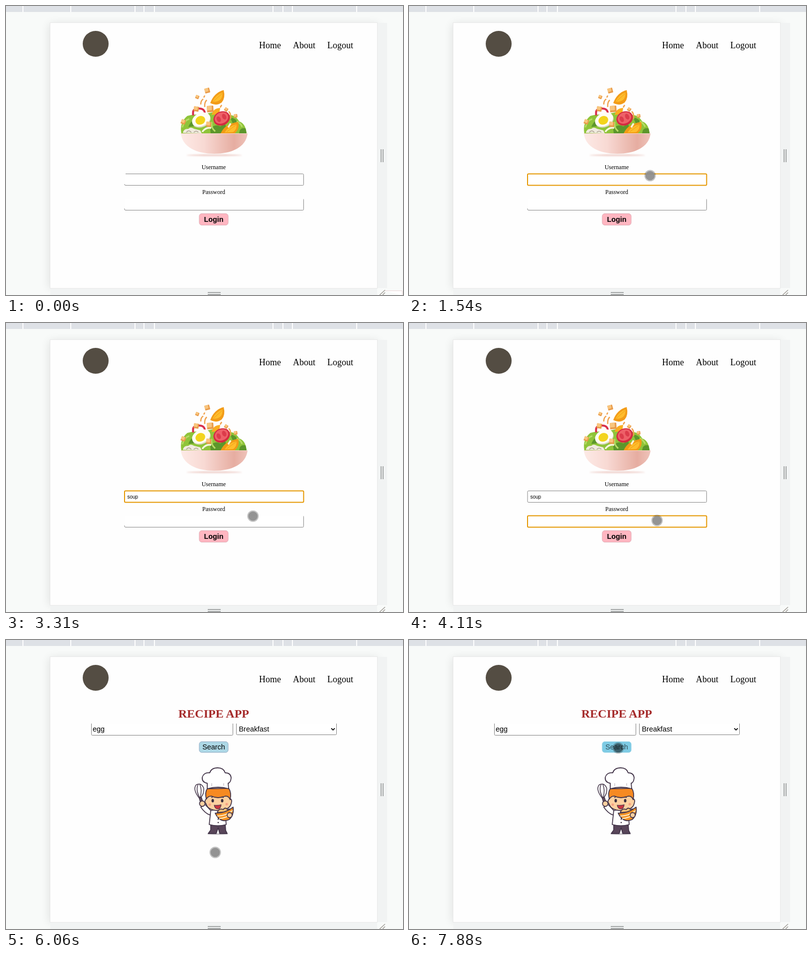
An HTML page that plays this animation: 797x581 px, repeating every 8 s.

```html
<!DOCTYPE html>
<html lang="en">
<head>
<meta charset="utf-8">
<title>Recipe app login</title>
<style>
  html, body { margin: 0; width: 100%; height: 100%; overflow: hidden; background: #f8faf9; }
  svg { display: block; width: 100%; height: 100%; }
  .serif { font-family: "Liberation Serif", "Times New Roman", serif; }
  .sans { font-family: "Liberation Sans", Arial, sans-serif; }
  .nav { font-size: 18px; }
  .label { font-size: 12px; text-anchor: middle; }
  .typed { font-size: 10px; }
  .control { font-size: 14.4px; }
  .middle { text-anchor: middle; }
  .field { fill: #fff; stroke: #858585; }
  .field.focus { stroke: #e59700; stroke-width: 2; }
  /* Edges not yet painted before a field is first used */
  #userField.fresh { stroke-dasharray: 739 40; }
  #passField.fresh { stroke-dasharray: 0 357 383 40; }
  .ink { stroke: #44364a; stroke-width: 1.8; stroke-linejoin: round; stroke-linecap: round; }
  #cursor { fill: #8f8f8f; fill-opacity: .92; }
  #cursor .halo { fill: #000; fill-opacity: .23; }
  #cursor.down { fill: #c5c54b; }
  #cursor.down .halo { fill: #d2d21c; fill-opacity: .7; }
  #cursor.over { fill: #000; fill-opacity: .38; }
  #search rect { fill: #add8e6; stroke: #91a9c4; }
  #search.hover rect { fill: #7ecbe4; stroke: #8bcfe5; }
  #search.hover text { fill: #334e58; }
</style>
</head>
<body>
<svg viewBox="0 0 797 581" xmlns="http://www.w3.org/2000/svg">
  <defs>
    <linearGradient id="china">
      <stop offset="0" stop-color="#fdeae6"/>
      <stop offset=".35" stop-color="#f8d9d3"/>
      <stop offset=".8" stop-color="#e6ada1"/>
      <stop offset="1" stop-color="#efc3ba"/>
    </linearGradient>
    <filter id="soft" x="-20%" y="-20%" width="140%" height="140%"><feGaussianBlur stdDeviation="9"/></filter>
    <filter id="blur" x="-20%" y="-200%" width="140%" height="500%"><feGaussianBlur stdDeviation="1.5"/></filter>
  </defs>

  <!-- Browser tools around the page -->
  <rect width="797" height="581" fill="#f8faf9"/>
  <rect x="87" y="36" width="660" height="532" fill="#000" opacity=".1" filter="url(#soft)"/>
  <rect width="797" height="12" fill="#dee1e6"/>
  <path id="rulerGaps" stroke="#fff" stroke-width="2"/>
  <path d="M745 34h20v533h-20zM89 567h656v14H89z" fill="#f1f3f3"/>
  <path d="M745 567h52v14h-52z" fill="#f8faf9"/>
  <rect x="88.5" y="33.5" width="657" height="534" fill="#fefefe" stroke="#e8e8e8"/>
  <path d="M753 288v26M757 288v26M405 576h26M405 580h26" stroke="#a3a6a6" stroke-width="2"/>
  <path d="M750 581l11-10M756 581l5-5" stroke="#a3a09a" stroke-width="1.6"/>
  <path id="corner" d="M761 572.5h34.5v9" fill="#fff" stroke="#e9d5d5"/>

  <circle cx="180" cy="76" r="26" fill="#544d43"/>
  <g class="serif nav">
    <text x="508" y="85">Home</text><text x="576" y="85">About</text><text x="645" y="85">Logout</text>
  </g>

  <g id="loginPage">
    <g id="salad">
      <ellipse cx="418" cy="300" rx="56" ry="1.5" fill="#ecc8c1" filter="url(#blur)"/>
      <path d="M352 256Q348 234 364 221 376 217 390 219L418 213 447 219Q461 219 468 232 481 236 483 256Z" fill="#8fc43a"/>
      <path d="M366 243q6-14 15-17l-4 16zM410 248q8-12 20-6l10-5q4 8-2 19h-27zM450 224q13 2 16 12l-10 2zM468 256q1-13 13-10l2 10z" fill="#5c962b"/>
      <path d="M354 244q4-14 14-17M413 233q-2 12 7 19M463 232q8 3 11 11" stroke="#b7dc66" stroke-width="3" fill="none"/>
      <path d="M376 220q-3-14 10-14 14 0 13 11" fill="none" stroke="#d8304c" stroke-width="4"/>
      <path d="M391 198q0-8 5-11M399 203q-1-9 4-14M447 212q5 4 4 15M430 204l3-5M397 184l2-4" fill="none" stroke="#f0a14b" stroke-width="2.5"/>
      <path d="M413 219q3-14 17-14l-2 12z" fill="#f9ad20"/>
      <path d="M410 195Q418 174 437 169 441 185 433 194 422 202 410 195Z" fill="#f39c18"/>
      <path d="M414 192Q421 178 435 173 436 185 429 190 421 195 414 192ZM417 191l17-15" fill="#ffbd2b" stroke="#f09a18"/>
      <g transform="rotate(-24 392 229)">
        <ellipse cx="392" cy="230" rx="19" ry="13.5" fill="#dedbc8"/>
        <ellipse cx="392" cy="228" rx="19" ry="13" fill="#fffdf2"/>
        <ellipse cx="390" cy="229" rx="10" ry="8.5" fill="#f3d41c"/>
      </g>
      <g transform="rotate(-25 433 226)">
        <ellipse cx="433" cy="226" rx="17" ry="14" fill="#d42a40"/>
        <ellipse cx="433" cy="225" rx="14" ry="11" fill="#ee6068"/>
        <ellipse cx="427" cy="225" rx="4" ry="6" fill="#dc3c4b"/>
        <ellipse cx="439" cy="225" rx="4" ry="6" fill="#dc3c4b"/>
      </g>
      <path d="M431 256Q439 237 466 233 470 247 459 256Z" fill="#f29b16"/>
      <path d="M438 255Q446 241 463 237 465 248 456 254ZM443 253l19-14" fill="#ffbd2b" stroke="#f09a18"/>
      <path d="M355 255q2-9 11-8 4-5 12 0l12 3 3 6z" fill="#f0ebdf"/>
      <path d="M362 254q5-6 10 0M377 254q5-5 9 0" fill="none" stroke="#aaa08e" stroke-width="1.5"/>
      <path d="M394 253q7-10 18-8M446 244l5-8" fill="none" stroke="#f8f7df" stroke-width="3.5"/>
      <g id="croutons"></g>
      <path d="M351 256H485C482 284 453 297 418 297C383 297 354 284 351 256Z" fill="url(#china)"/>
      <path d="M351 256.5H485" stroke="#f8d8d1"/>
    </g>
    <g class="serif label"><text x="417" y="328">Username</text><text x="417" y="378">Password</text></g>
    <rect class="field" id="userField" x="238" y="337.5" width="359.5" height="23" rx="2"/>
    <rect class="field" id="passField" x="238" y="387.5" width="359.5" height="23" rx="2"/>
    <g class="sans typed">
      <text id="userText" x="243.5" y="353"/>
      <text id="passText" x="243.5" y="402"/>
    </g>
    <rect id="caret" width="1" height="12"/>
    <rect x="388" y="417.5" width="58" height="23" rx="5" fill="#ffb6c1" stroke="#dfa9b2"/>
    <text class="sans control middle" x="417" y="434" font-weight="bold">Login</text>
  </g>

  <g id="searchPage">
    <text class="serif middle" x="417" y="156" font-size="24" font-weight="bold" fill="#a52a2a">RECIPE APP</text>
    <path d="M171.500 168V189.500q0 2 2 2H453.500q2 0 2-2V168M462.500 168V188.500q0 2 2 2H661.500q2 0 2-2V168" fill="#fff" stroke="#808080"/>
    <g class="sans control">
      <text x="174" y="184">egg</text>
      <text x="467.5" y="184">Breakfast</text>
      <g id="search"><rect x="388" y="204.5" width="58" height="21.5" rx="5"/><text class="middle" x="417" y="220">Search</text></g>
    </g>
    <path d="M653 177.500l3.500 3.500 3.500-3.500" fill="none" stroke="#111" stroke-width="1.8"/>
    <g id="chef">
      <ellipse cx="425" cy="390" rx="21" ry="1.8" fill="#c9c5ca"/>
      <g class="ink">
        <path d="M411 369h29l1 14 3 6h-15l-3-12-4 12h-16l5-7z" fill="#59465a"/>
        <path d="M412 344L400 331 391 336Q400 349 410 352Z" fill="#fff"/>
        <path d="M411 343Q425 338 440 344L442 371Q426 376 408 371Z" fill="#fff"/>
        <path d="M388 317l3 12 5-1-4-12z" fill="#6d5566"/>
        <path d="M388 318Q374 300 382 291 392 286 397 298 398 309 391 317ZM389 317Q380 301 386 290M390 317Q394 301 389 290" fill="none" stroke-width="1.5"/>
        <circle cx="394" cy="329" r="5.5" fill="#fdd0a0"/>
        <path d="M402 307H450V319Q455 321 452 329 449 342 426 343 405 342 402 330 397 325 402 319Z" fill="#fdd0a0"/>
        <path d="M402 320Q399 306 404 299L447 298Q453 306 450 321 447 313 440 314 425 320 413 314 406 313 402 320Z" fill="#f78a22"/>
        <path d="M404 299V288Q393 286 394 276 397 266 409 267 412 257 425 257 437 257 440 267 451 267 452 277 451 287 446 288L447 299Q426 293 404 299Z" fill="#fff"/>
        <path d="M418 332q8 1 14-1-1 9-7 9-6-1-7-8z" fill="#c93641" stroke-width="1.2"/>
        <path d="M424 347Q428 337 436 341 440 335 445 341 453 337 453 345Z" fill="#f7c376"/>
        <path d="M420 348Q439 349 456 336 458 352 448 361 430 369 420 348Z" fill="#f49324"/>
      </g>
      <path d="M424 354q17 0 31-11M428 359q14-1 24-9" fill="none" stroke="#fff0cf" stroke-width="2"/>
      <circle class="ink" cx="449" cy="352" r="5" fill="#fdd0a0"/>
      <g fill="#382d3e"><ellipse cx="415" cy="323" rx="2.5" ry="3.5"/><ellipse cx="434" cy="323" rx="2.5" ry="3.5"/><circle cx="426" cy="360" r="1.3"/><circle cx="426" cy="367" r="1.3"/></g>
      <path d="M412 317l4-2M433 315l4 2" stroke="#44364a" stroke-width="1.4"/>
      <g fill="#f6a184"><circle cx="409" cy="331" r="2.5"/><circle cx="443" cy="330" r="2.5"/></g>
      <path d="M413 288v6M437 288v5" stroke="#bdb5bd" stroke-width="1.2"/>
    </g>
  </g>

  <g id="cursor"><circle class="halo" r="11.5"/><circle r="9.3"/></g>
</svg>
<script>
const LOOP = 8000, BLINK = 530;
const USER = "soup";
const PAGE_CHANGE = 5990;
const focusTimes = { user: 1010, pass: 3580 };
const userKeys = [1800, 2020, 2160, 2360];
const passKeys = [4170, 4370, 4510, 4770, 4900];
const clicks = [[880, 1140], [3500, 3650], [5850, 6000]];

// Pointer moves: start, end, number of steps, destination.
const START = [805, 600];
const moves = [
  [70, 750, 10, 484, 341],
  [2890, 3420, 8, 498, 397],
  [5430, 5780, 6, 420, 427],
  [6460, 6690, 4, 536, 178],
  [6760, 6930, 3, 363, 185],
  [7000, 7070, 2, 353, 176],
  [7140, 7200, 2, 384, 182],
  [7270, 7880, 8, 420, 217]
];

const el = id => document.getElementById(id);
const show = (id, on) => el(id).setAttribute("visibility", on ? "visible" : "hidden");
const toggle = (id, name, on) => el(id).classList.toggle(name, on);
const ease = p => p * p * (3 - 2 * p);

el("rulerGaps").setAttribute("d",
  [34, 130, 259, 277, 298, 536, 556, 575, 704].map(x => `M${x} 0V12`).join(""));

el("croutons").innerHTML = [
  [404, 170, 10], [384, 183, 7], [382, 207, 10], [410, 207, 13],
  [442, 208, 7], [356, 233, 9], [407, 238, 10], [461, 221, 7]
].map(([x, y, size], i) =>
  `<g transform="translate(${x} ${y}) rotate(${i * 37 % 50 - 15})">
    <rect x="${-size / 2}" y="${-size / 2}" width="${size}" height="${size}" rx="1" fill="#e99b49"/>
    <rect x="${-size / 2}" y="${-size / 2}" width="${size * .75}" height="${size * .7}" rx="1" fill="#f8c57e"/>
  </g>`).join("");

function pointerAt(t) {
  let [x, y] = START;
  for (const [from, to, steps, nextX, nextY] of moves) {
    if (t < from) break;
    const step = Math.floor((t - from) / (to - from) * (steps - 1) + 1e-6) + 1;
    const p = ease(Math.min(1, step / steps));
    x += (nextX - x) * p;
    y += (nextY - y) * p;
  }
  return [x, y];
}

function draw(t) {
  const searching = t >= PAGE_CHANGE;
  show("loginPage", !searching);
  show("searchPage", searching);
  show("corner", t < 70);

  const focused = t >= focusTimes.user;
  const inPassword = t >= focusTimes.pass;
  toggle("userField", "focus", focused && !inPassword);
  toggle("passField", "focus", inPassword);
  toggle("userField", "fresh", !focused);
  toggle("passField", "fresh", !inPassword);

  const typed = keys => keys.filter(time => time <= t).length;
  el("userText").textContent = USER.slice(0, typed(userKeys));
  el("passText").textContent = "•".repeat(typed(passKeys));

  const keys = inPassword ? passKeys : userKeys;
  const lastKey = keys[typed(keys) - 1] ?? (inPassword ? focusTimes.pass : focusTimes.user);
  const text = el(inPassword ? "passText" : "userText");
  const caret = el("caret");
  caret.setAttribute("x", Math.round(243.5 + (text.textContent ? text.getComputedTextLength() : 0)));
  caret.setAttribute("y", inPassword ? 392 : 343);
  show("caret", focused && !searching && Math.floor((t - lastKey) / BLINK) % 2 === 0);

  const [x, y] = pointerAt(t);
  const overSearch = searching && x > 388 && x < 446 && y > 204 && y < 227;
  el("cursor").setAttribute("transform", `translate(${x} ${y})`);
  toggle("cursor", "down", clicks.some(([from, to]) => t >= from && t < to));
  toggle("cursor", "over", overSearch);
  toggle("search", "hover", overSearch);
}

const began = performance.now();
function tick() {
  draw((performance.now() - began) % LOOP);
  requestAnimationFrame(tick);
}
tick();
</script>
</body>
</html>
```
